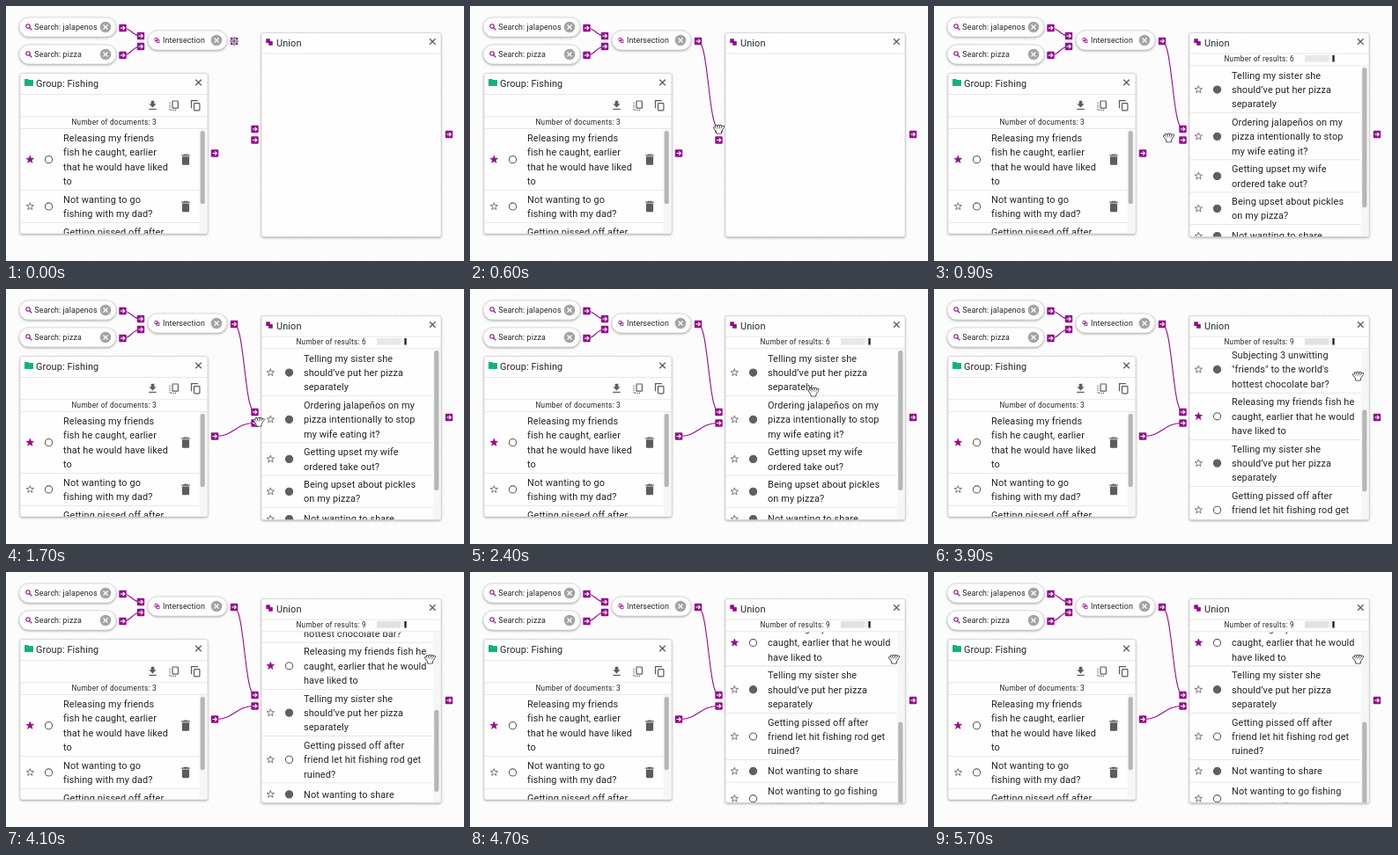
An HTML page with a canvas for the animation above (5800 ms loop, 520x290 px).

```html
<!DOCTYPE html>
<html lang="en">
<head>
<meta charset="utf-8">
<title>Document sets</title>
<style>
html, body { margin: 0; width: 100%; height: 100%; overflow: hidden; background: #fdfcfd; }
canvas { display: block; }
</style>
</head>
<body>
<canvas id="stage" width="520" height="290"></canvas>
<script>
const ctx = document.getElementById('stage').getContext('2d');
const LOOP = 5800, LINE = 16.4;
const PURPLE = '#940c8c', GREY = '#5c5c5c', INK = '#242424', RULE = '#dfdfdf', PAPER = '#fefefe';

// Documents: lines of text, in the fishing group, starred
const doc = (text, fishing, starred) => ({ lines: text.split('|'), fishing, starred });
const ordering = doc('Ordering jalapeños on my|pizza intentionally to stop|my wife eating it?'),
  takeOut = doc('Getting upset my wife|ordered take out?'),
  pickles = doc('Being upset about pickles|on my pizza?'),
  chocolate = doc('Subjecting 3 unwitting|"friends" to the world\'s|hottest chocolate bar?'),
  releasing = doc('Releasing my friends fish he|caught, earlier that he would|have liked to', true, true),
  telling = doc('Telling my sister she|should’ve put her pizza|separately'),
  rod = doc('Getting pissed off after|friend let hit fishing rod get|ruined?', true),
  share = doc('Not wanting to share'),
  dad = doc('Not wanting to go fishing|with my dad?', true);
const firstResults = [telling, ordering, takeOut, pickles, share, chocolate];
const allResults = [ordering, takeOut, pickles, chocolate, releasing, telling, rod, share, dad];
const group = [
  doc('Releasing my friends|fish he caught, earlier|that he would have liked|to', true, true),
  doc('Not wanting to go|fishing with my dad?', true),
  doc('Getting pissed off after|friend let hit fishing|rod get ruined?', true)
];

// Links between ports; those with times are pulled out by the cursor
const at = (x, y) => ({ x, y });
const overlapOut = at(259, 40), groupOut = at(237, 167.5), unionOut = at(503, 146),
  unionA = at(282.5, 140), unionB = at(282.5, 152.5);
const links = [
  { from: at(132.5, 25), to: at(153, 34) },
  { from: at(132.5, 56), to: at(153, 46) },
  { from: overlapOut, to: unionA, start: 0, end: 600 },
  { from: groupOut, to: unionB, start: 1300, end: 1600 }
];
const stops = [
  { start: 0, end: 600, to: unionA },
  { start: 700, end: 1200, to: groupOut },
  { start: 1300, end: 1600, to: unionB },
  { start: 1600, end: 2400, to: at(390, 117) },
  { start: 2500, end: 3000, to: at(481.5, 99) }
];

// Eased progress from 0 to 1 between two times
function ease(t, start, end) {
  const p = Math.min(1, Math.max(0, (t - start) / (end - start)));
  return p * p * (3 - 2 * p);
}

function cursorAt(t) {
  let { x, y } = overlapOut;
  for (const s of stops) {
    const p = ease(t, s.start, s.end);
    x += (s.to.x - x) * p;
    y += (s.to.y - y) * p;
  }
  return at(x, y);
}

function text(s, x, y, size = 10.92, spacing = .0094) {
  ctx.font = size + 'px Roboto, sans-serif';
  ctx.letterSpacing = size * spacing + 'px';
  ctx.fillStyle = INK;
  ctx.fillText(s, x, y + size * .355);
}
const caption = (s, x, y) => text(s, x, y, 8.19, .0333);

function rect(x, y, w, h, color, r = 0) {
  ctx.fillStyle = color;
  ctx.beginPath();
  ctx.roundRect(x, y, w, h, r);
  ctx.fill();
}

function frame(x, y, w, h, color = GREY, width = 1.2, r = .8) {
  ctx.strokeStyle = color;
  ctx.lineWidth = width;
  ctx.beginPath();
  ctx.roundRect(x, y, w, h, r);
  ctx.stroke();
}

// Straight strokes through points given as x, y, x, y...
function line(color, width, ...p) {
  ctx.strokeStyle = color;
  ctx.lineWidth = width;
  ctx.beginPath();
  for (let i = 0; i < p.length; i += 2) ctx.lineTo(p[i], p[i + 1]);
  ctx.stroke();
}

function circle(x, y, r, color, filled) {
  ctx.fillStyle = ctx.strokeStyle = color;
  ctx.lineWidth = 1.1;
  ctx.beginPath();
  ctx.arc(x, y, r, 0, 7);
  ctx.stroke();
  if (filled) ctx.fill();
}

function clipped(x, y, w, h, paint) {
  ctx.save();
  ctx.beginPath();
  ctx.rect(x, y, w, h);
  ctx.clip();
  paint();
  ctx.restore();
}

function cross(x, y, r, color = GREY) {
  line(color, 1.25, x - r, y - r, x + r, y + r);
  line(color, 1.25, x - r, y + r, x + r, y - r);
}

function star(x, y, filled) {
  ctx.beginPath();
  for (let i = 0; i < 10; i++) {
    const a = i * Math.PI / 5, r = i % 2 ? 1.8 : 4.4;
    ctx.lineTo(x + r * Math.sin(a), y - r * Math.cos(a));
  }
  ctx.closePath();
  ctx.fillStyle = ctx.strokeStyle = filled ? PURPLE : GREY;
  ctx.lineWidth = .8;
  ctx.stroke();
  if (filled) ctx.fill();
}

function trash(x, y) {
  rect(x - 2.4, y - 6.2, 4.8, 1.4, GREY);
  rect(x - 4.8, y - 5.5, 9.6, 1.4, GREY);
  rect(x - 4.1, y - 3.4, 8.2, 9.6, GREY, [0, 0, 1.3, 1.3]);
}

function magnifier(x, y) {
  circle(x - 1, y - 1, 2.2, PURPLE);
  line(PURPLE, 1.2, x + .6, y + .6, x + 3.4, y + 3.4);
}

function download(x, y) {
  rect(x - 1.8, y - 5.2, 3.6, 4, GREY);
  line(GREY, 1.2, x - 4.2, y + 4.4, x + 4.2, y + 4.4);
  ctx.fillStyle = GREY;
  ctx.beginPath();
  ctx.moveTo(x - 4.1, y - 1.8);
  ctx.lineTo(x + 4.1, y - 1.8);
  ctx.lineTo(x, y + 2.4);
  ctx.fill();
}

// A sheet in front of another one, whose visible edge may be dashed
function sheets(x, y, side, dash) {
  frame(x - 3.2 + side * 1.2, y - 3.6 + (dash ? -1.4 : 1.2), 6.4, 8.2);
  const edgeX = x - side * 5, edgeY = y + (dash ? 5.4 : -5.4);
  ctx.setLineDash(dash ? [1.2, 1.2] : []);
  line(GREY, 1.2, edgeX, y + (dash ? -3.2 : 3.2), edgeX, edgeY, x + side * 2.4, edgeY);
  ctx.setLineDash([]);
}

function overlap(x, y, size, hollow) {
  const s = size * .62, x0 = x - size / 2, y0 = y - size / 2, d = size - s;
  for (const o of [0, d]) {
    if (hollow) frame(x0 + o, y0 + o, s, s, PURPLE, .8, 0);
    else rect(x0 + o, y0 + o, s, s, PURPLE, .5);
  }
  if (hollow) rect(x0 + d, y0 + d, s - d, s - d, PURPLE);
}

function box(x, y, w, h, r) {
  ctx.save();
  ctx.shadowColor = 'rgba(0,0,0,.38)';
  ctx.shadowBlur = 3;
  ctx.shadowOffsetY = 1;
  rect(x, y, w, h, PAPER, r);
  ctx.restore();
  frame(x, y, w, h, '#d2d2d2', .7, r);
}

function chip(x, y, w, label, textX) {
  box(x, y - 11, w, 22, 11);
  text(label, x + textX, y, 8.87, .0107);
  circle(x + w - 12, y, 5.7, '#a3a3a3', true);
  cross(x + w - 12, y, 2.5, '#fff');
}

function searchChip(y, query) {
  chip(15, y, 110, 'Search: ' + query, 17.3);
  magnifier(26, y);
}

function port({ x, y }) {
  rect(x - 4.2, y - 4.2, 8.4, 8.4, PURPLE, 1);
  line('#fff', 1.1, x - 2.6, y, x + 2, y);
  line('#fff', 1.1, x + .2, y - 2.1, x + 2.3, y, x + .2, y + 2.1);
}

function edge(a, b) {
  const mid = (a.x + b.x) / 2;
  ctx.strokeStyle = PURPLE;
  ctx.lineWidth = 1.1;
  ctx.beginPath();
  ctx.moveTo(a.x, a.y);
  ctx.bezierCurveTo(mid, a.y, mid, b.y, b.x, b.y);
  ctx.stroke();
}

// Rows of documents starting at the given corner
function list(docs, x, y, w, textX, withTrash) {
  for (const d of docs) {
    const n = d.lines.length, rowH = Math.max(25.6, n * LINE + 4.1), mid = y + rowH / 2;
    star(x + 10.8, mid, d.starred);
    circle(x + 32, mid, 4.1, '#606060', !d.fishing);
    d.lines.forEach((s, i) => text(s, textX, mid + (i - (n - 1) / 2) * LINE));
    if (withTrash) trash(204, mid);
    y += rowH;
    rect(x, y - .5, w, .8, RULE);
  }
}

function scrollbar(x, y, h, thumbY, thumbH) {
  rect(x - 1, y, 8, h, '#f6f6f6');
  rect(x, thumbY, 5.2, thumbH, '#b6b6b6', 2.6);
}

function groupPanel() {
  box(16, 76.5, 213, 182.5, 2);
  rect(21, 82.9, 4.8, 3, '#12b27c', 1);
  rect(21, 84, 10, 7, '#12b27c', 1);
  text('Group: Fishing', 34, 88.2);
  cross(218.5, 87, 3.3);
  download(166.5, 113);
  sheets(191, 113, 1, true);
  sheets(215.5, 113, 1, false);
  caption('Number of documents: 3', 74.5, 132.5);
  for (const y of [100, 125.5, 139]) rect(16, y, 213, .8, RULE);
  clipped(16, 139.8, 213, 119, () => {
    list(group, 16.5, 139.8, 204, 65, true);
    scrollbar(220.6, 140, 118.5, 142, 83);
  });
}

function unionPanel(t) {
  box(290, 30.5, 204, 232, 2);
  overlap(299, 41, 7.5);
  text('Union', 307, 42.5);
  cross(484.3, 40.5, 3.3);
  rect(290, 53.8, 204, .8, RULE);
  if (t < 700) return;

  const full = t >= 2500, scroll = 195 * ease(t, 3100, 4400);
  const docs = full ? allResults : firstResults;
  caption('Number of results: ' + docs.length, 329.5, 60.3);
  rect(421, 56, 35, 7.5, '#f1f1f1');
  for (let x = 421; x < 448; x += 2.1) rect(x, 56, 1.4, 7.5, full ? '#dadada' : '#e4e4e4');
  rect(452.4, 56, 2.2, 7.5, '#1c1c1c');
  rect(290, 67.5, 204, .8, RULE);
  clipped(290, 68.4, 204, 193.8, () => {
    list(docs, 289.5, 68.4 - scroll, 195, 338, false);
    scrollbar(486.2, 68.4, 193.8, 70 + scroll * .515, full ? 93 : 159);
  });
}

function crosshair({ x, y }) {
  for (const [w, color] of [[3, '#fff'], [1, '#333']]) {
    line(color, w, x - 5, y, x + 5, y);
    line(color, w, x, y - 5, x, y + 5);
  }
}

// Open hand: a palm with a fan of fingers, dark outline below white
function hand({ x, y }) {
  ctx.save();
  ctx.lineCap = ctx.lineJoin = 'round';
  for (const [grow, color] of [[1.5, '#333'], [0, '#fff']]) {
    for (let i = 0; i < 5; i++) {
      const a = (i - 2.2) * .38, reach = i ? 4.8 : 4;
      line(color, 1.5 + grow, x + i - 2, y + 2, x + i - 2 + reach * Math.sin(a), y + 1 - reach * Math.cos(a));
    }
    rect(x - 2.6 - grow / 2, y + .5, 5.2 + grow, 4.3 + grow / 2, color, 1.5);
  }
  ctx.restore();
}

function draw(t) {
  rect(0, 0, 520, 290, '#fdfcfd');
  for (let x = 5; x < 520; x += 10.92)
    for (let y = 5; y < 290; y += 10.92) rect(x, y, .9, .9, '#e6e6e6');

  searchChip(24, 'jalapenos');
  searchChip(55, 'pizza');
  chip(161, 39, 90, 'Intersection', 17);
  overlap(171.5, 39, 5, true);
  groupPanel();
  unionPanel(t);

  const cursor = cursorAt(t);
  let dragging = false;
  for (const { from, to, start = -1, end = -1 } of links) {
    const pulled = t >= start && t < end;
    if (t >= start) edge(from, pulled ? cursor : to);
    dragging ||= pulled;
  }
  for (const { from, to } of links) [from, to].forEach(port);
  port(unionOut);
  (dragging ? crosshair : hand)(cursor);
}

function tick() {
  // The motion advances in tenths of a second
  draw(Math.floor(performance.now() % LOOP / 100) * 100);
  requestAnimationFrame(tick);
}
tick();
</script>
</body>
</html>
```
